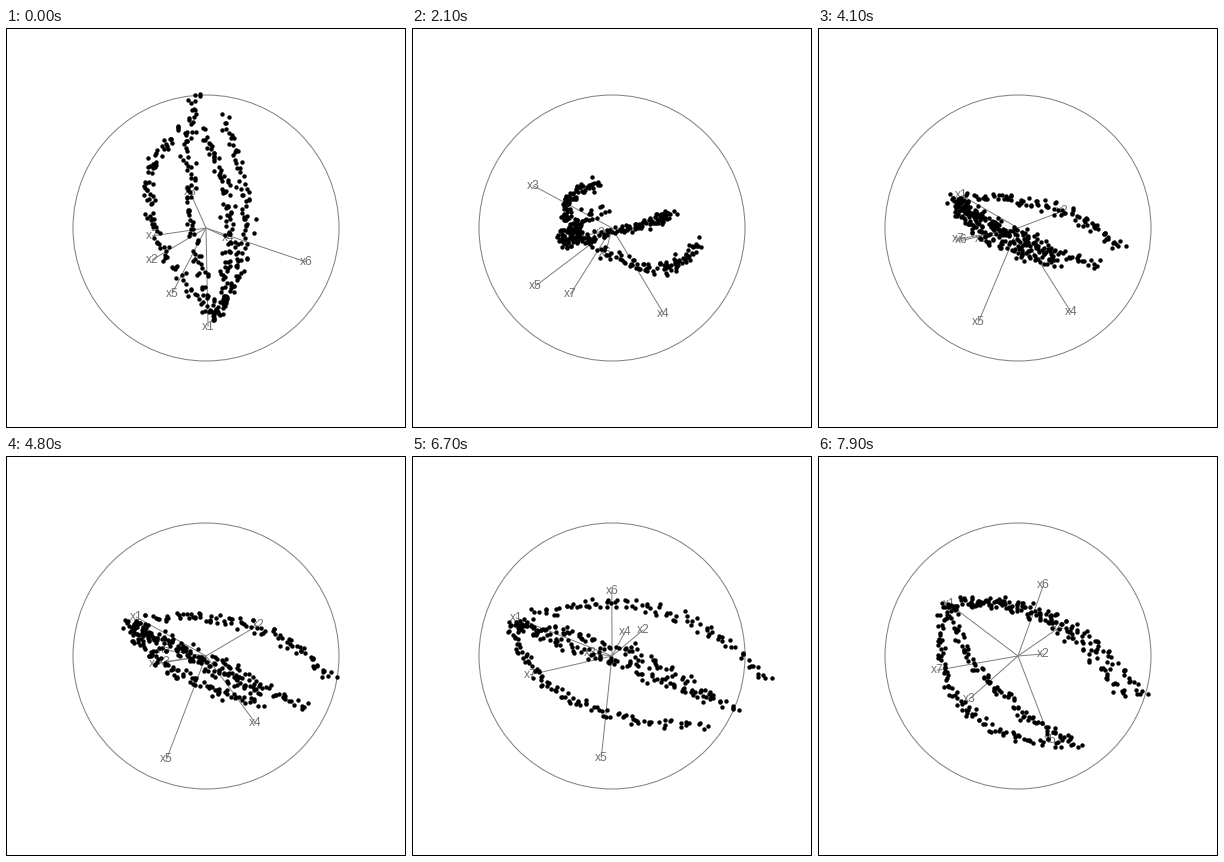
Recreate the animation shown at these times as a matplotlib script. Size 400 px wide and 400 px high, loop 8000 ms.

```python
import numpy as np
import matplotlib.pyplot as plt
from matplotlib.animation import FuncAnimation
from matplotlib.collections import LineCollection
from matplotlib.patches import Circle, Rectangle

SIZE, DPI = 400, 100
FRAMES, STEP = 80, 100
MID, RADIUS = 200, 133
PER_BRANCH, SPREAD = 94, 0.024
PT = 72 / DPI
GREY = "#7f7f7f"

# Key views of the tour: time in ms, then x and y ends of the seven axes
VIEWS = {
    0: ([2, -54, -16, 22, -34, 100, -54], [99, 32, -36, 10, 66, 34, 8]),
    1100: ([-6, -38, -75, 19, -82, 57, -17], [53, 9, -54, 44, 53, 25, 83]),
    3200: ([-50, 22, -23, 49, -37, -65, -78], [-23, 5, 2, 96, 86, 22, 21]),
    4800: ([-70, 52, -42, 49, -40, -42, -51], [-39, -31, 6, 67, 104, -6, 8]),
    5600: ([-98, 36, -17, 15, -35, -30, -65], [-40, -34, -18, 22, 111, -42, 12]),
    6700: ([-96, 31, -22, 13, -11, 0, -82], [-38, -26, -3, -24, 102, -65, 19]),
    7900: ([-68, 25, -48, 40, 32, 25, -80], [-52, -2, 43, -28, 84, -71, 14]),
}
TIMES = np.array(list(VIEWS), float)
BASES = np.array(list(VIEWS.values()), float)
SLOPES = np.gradient(BASES, TIMES, axis=0)

# Four arcs in seven dimensions leave one hub: (tip, bulge) of each
HUB = np.array([0.95, -0.15, 0, 0, 0, 0, 0.05])
ARCS = np.array([
    ([-1.26, 0.5, -0.27, -0.09, -0.01, 0.13, -0.2],
     [0, 0.18, 0, 0.07, -0.25, 0.21, 0]),
    ([-1.3, -0.22, -0.55, 0, 0, 0, 0.04],
     [0, 0, -0.3, 0, -0.05, 0.3, 0.16]),
    ([-1.2, 0, 0.5, -0.16, 0, 0.05, 0],
     [0, 0.15, 0.27, 0, 0, -0.02, 0.04]),
    ([-1.1, 0.1, 0.13, -0.24, 0.22, -0.02, 0.05],
     [0, -0.05, 0.18, 0, 0, -0.25, 0.4]),
])


def make_data():
    rng = np.random.default_rng(7)
    parts = []
    for tip, bulge in ARCS:
        s = (np.arange(PER_BRANCH) + rng.uniform(0, 1, PER_BRANCH)) / PER_BRANCH
        s = s[:, None]
        parts.append(HUB + s * (tip - HUB) + 4 * s * (1 - s) * bulge)
    data = np.vstack(parts)
    return data + rng.normal(0, SPREAD, data.shape)


def basis(t):
    """Smooth step between key views, kept an orthonormal projection."""
    i = min(np.searchsorted(TIMES, t, "right") - 1, len(TIMES) - 2)
    h = TIMES[i + 1] - TIMES[i]
    u = (t - TIMES[i]) / h
    mix = ((1 + 2 * u) * (1 - u) ** 2 * BASES[i]
           + u * (1 - u) ** 2 * h * SLOPES[i]
           + u * u * (3 - 2 * u) * BASES[i + 1]
           + u * u * (u - 1) * h * SLOPES[i + 1])
    left, _, right = np.linalg.svd(mix, full_matrices=False)
    return RADIUS * (left @ right).T


data = make_data()

fig = plt.figure(figsize=(SIZE / DPI, SIZE / DPI), dpi=DPI, facecolor="white")
ax = fig.add_axes([0, 0, 1, 1])
ax.set(xlim=(0, SIZE), ylim=(SIZE, 0))
ax.axis("off")
ax.add_patch(Rectangle((0.5, 0.5), SIZE - 1, SIZE - 1, fill=False,
                       ec="black", lw=PT, snap=False))
ax.add_patch(Circle((MID, MID), RADIUS, fill=False, ec=GREY, lw=PT))
spokes = LineCollection([], colors=GREY, linewidths=PT, zorder=2)
ax.add_collection(spokes)
labels = [ax.text(MID, MID, f"x{k}", color="#707070", family="Liberation Sans",
                  size=12 * PT, ha="center", va="center", zorder=3)
          for k in range(1, 8)]
dots = ax.scatter([], [], s=(4.4 * PT) ** 2, c="black", linewidths=0, zorder=4)


def draw(frame):
    axes = basis(frame * STEP)
    ends = MID + axes
    spokes.set_segments([[(MID, MID), tuple(end)] for end in ends])
    for label, end in zip(labels, ends):
        label.set_position(end)
    dots.set_offsets(MID + data @ axes)
    return [spokes, dots, *labels]


anim = FuncAnimation(fig, draw, frames=FRAMES, interval=STEP, repeat=True,
                     repeat_delay=0)
plt.show()
```
